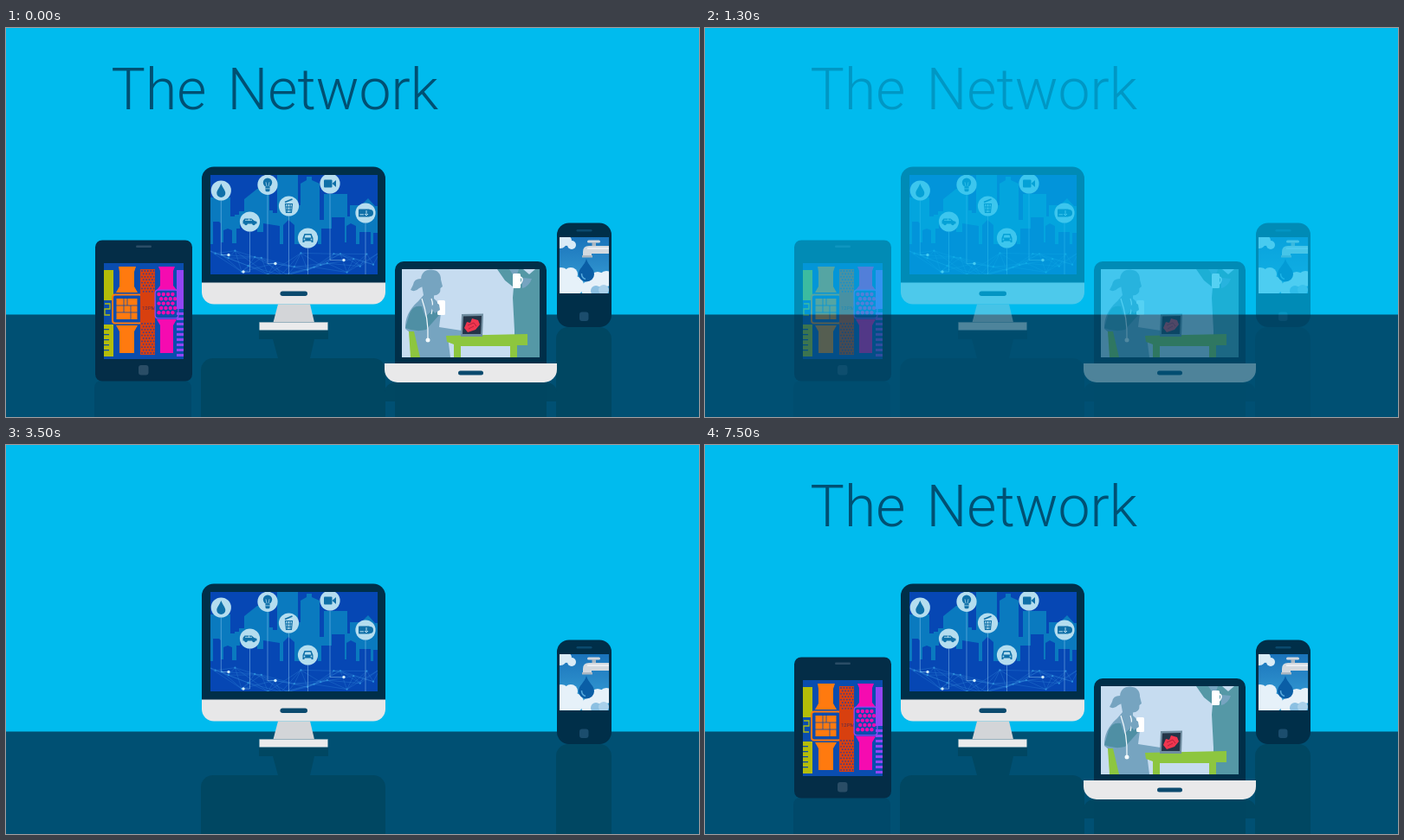
Animation, 800 px wide and 450 px high, one loop 8000 ms. Source, as an HTML page with a canvas:

```html
<!DOCTYPE html>
<html lang="en">
<head>
<meta charset="utf-8">
<title>Devices</title>
<style>
  html, body { margin: 0; width: 100%; height: 100%; overflow: hidden; background: #00bbee; }
  canvas, svg { position: absolute; left: 0; top: 0; width: 800px; height: 450px; display: block; }
  text { font: 300 66px Roboto, "Open Sans", sans-serif; word-spacing: 8px; fill: #005073; }
</style>
</head>
<body>
<canvas id="stage" width="800" height="450"></canvas>
<svg viewBox="0 0 800 450"><text id="title" x="121.5" y="93.5">The Network</text></svg>
<script>
const LOOP = 8000;
const DARK = '#002f49', FLOOR = '#005073', SHADE = '#004762', SLOT = '#0b4a6e';
const BLUE = '#0647b4', PALE = '#b4ddef', INK = '#0f70a8';

const stage = document.getElementById('stage').getContext('2d');
const title = document.getElementById('title');
const layer = document.createElement('canvas');
layer.width = 800;
layer.height = 450;
const c = layer.getContext('2d');

function box(color, x, y, w, h, r = 0) {
  c.fillStyle = color;
  c.beginPath();
  c.roundRect(x, y, w, h, r);
  c.fill();
}

function disc(color, x, y, r) {
  c.fillStyle = color;
  c.beginPath();
  c.arc(x, y, r, 0, Math.PI * 2);
  c.fill();
}

function shape(color, d) {
  c.fillStyle = color;
  c.fill(new Path2D(d));
}

function line(color, d, width = 1) {
  c.strokeStyle = color;
  c.lineWidth = width;
  c.stroke(new Path2D(d));
}

function clipped(x, y, w, h, draw) {
  c.save();
  c.beginPath();
  c.rect(x, y, w, h);
  c.clip();
  draw();
  c.restore();
}

function at(x, y, draw) {
  c.save();
  c.translate(x, y);
  draw();
  c.restore();
}

function vertical(y0, y1, a, b) {
  const g = c.createLinearGradient(0, y0, 0, y1);
  g.addColorStop(0, a);
  g.addColorStop(1, b);
  return g;
}

function seeded(seed) {
  return () => (seed = (seed * 16807) % 2147483647) / 2147483647;
}

const icons = [
  [248.3, 188, 'V262.5 H257', () =>
    shape(INK, 'M0-8C2-3 5 0 5 3A5 5 0 0 1-5 3C-5 0-2-3 0-8Z')],
  [302, 181.3, 'V272.5 H311', () => {
    disc(INK, 0, -2.5, 5.2);
    box(INK, -2.5, 1.5, 5, 6.5, 1.5);
    line(PALE, 'M-2-3 L-1 2 M2-3 L1 2 M-2.5 4.5 H2.5', 0.7);
  }],
  [326.5, 206, 'V285', () => {
    line(INK, 'M-4-2.5H4L3 7.5H-3Z M-1.5-2V7 M1.5-2V7 M-4 1H4 M-3.5 4.3H3.5', 1.1);
    line(INK, 'M-4.5-4.5L4-8', 1.8);
  }],
  [374, 180, 'V268.5 H390', () => {
    box(INK, -7, -4.5, 9.5, 9, 1);
    shape(INK, 'M2.5 0L7-4V4Z');
  }],
  [415, 214, 'V285', () => {
    box(INK, -8, -4.5, 13, 9, 1);
    disc(INK, 5, 0, 4);
    line(PALE, 'M-6.5 1.8H-2 M1-3V3 M-1 1L1 3L3 1', 1);
  }],
  [281.5, 224, 'V282 H274', () => {
    shape(INK, 'M-8 2.5V-1L-6-3.5H2L5-1L8 0V2.5Z');
    disc(INK, -4.5, 2.5, 1.8);
    disc(INK, 4.5, 2.5, 1.8);
    line(PALE, 'M-5.5-1.7H2.5 M-1-3.5V-1', 0.9);
  }],
  [348.5, 243, 'V285', () => {
    shape(INK, 'M-6 5V0L-4-5H4L6 0V5H4V3.5H-4V5Z');
    shape(PALE, 'M-4-.5L-3-3.5H3L4-.5Z');
    disc(PALE, -4, 1.5, 0.9);
    disc(PALE, 4, 1.5, 0.9);
  }]
];

function city() {
  box(BLUE, 236, 170, 193, 115);
  shape('#0a7abf', 'M236 196H259V218H264V216H269V212H275V198L290 186H304V211H308V214H313V170H337V205H340V180L347 176V172H353V176L362 180V222H367V192H394V218H397V205H410L418 197L426 206H429V250H236Z');
  shape(BLUE, 'M236 285V250H239V224H246L248 226V248H251V234L256 232L261 234V249H266V232H270V222H290V236H297V226L316 229V251H320V228L326 222L333 228V252H345V238H360V252H364V232H376V219H391V248H393V229L398 226L404 229V250H408V236H421V250H424V237H429V285Z');
  const rnd = seeded(77);
  const nodes = Array.from({ length: 27 }, (_, i) => [234 + i * 7.6, 257 + rnd() * 29]);
  nodes.forEach(([x, y], i) => {
    for (const k of [1, 3, 5]) {
      const n = nodes[i + k];
      if (n) line('rgba(60,150,225,.45)', `M${x} ${y}L${n[0]} ${n[1]}`, 0.6);
    }
    disc('#2b8fdc', x, y, 1.1);
  });
  for (const [x, y, stem] of icons) line('rgba(150,205,240,.6)', `M${x} ${y + 11}${stem}`, 0.8);
  for (const [x, y] of [[257, 262.5], [311, 272.5], [390, 268.5], [274, 282]]) disc('#d0ecfa', x, y, 1.7);
  for (const [x, y, , draw] of icons) {
    disc(PALE, x, y, 11.6);
    at(x, y, draw);
  }
}

function monitor() {
  box(SHADE, 292, 350, 80, 10);
  shape(SHADE, 'M308 360H356L351 382H314Z');
  box(SHADE, 225, 382, 213, 80, 14);
  box(DARK, 226, 160.5, 212, 150, 14);
  box('#e7e7e8', 226, 294.5, 212, 25, [0, 0, 14, 14]);
  box(SLOT, 316.5, 304.5, 31.5, 5.5, 2.7);
  shape('#d3d5d8', 'M314 319.5H351L356 340.5H308.5Z');
  box('#ebebec', 292.5, 340.5, 79, 9);
  line('#8fa9b8', 'M292.5 340.5H371.5', 0.7);
  clipped(236, 170, 193, 115, city);
}

function cafe() {
  const skin = '#76a4c0', sleeve = '#4f8fa4';
  box('#c6dcf0', 457, 279, 159, 102);
  // Man at right
  shape('#5598a6', 'M567 279H616V381H587V350L585 312L586 300L576 292Z');
  shape(skin, 'M581 279H592L590 285H585Z M596 289L607 290Q604 299 596 301Z');
  shape('#c6dcf0', 'M597 279H611L604 285Z');
  box('#fff', 585, 284, 9, 17, 1.5);
  line('#fff', 'M594 288Q598 290 594 296', 1.5);
  // Woman at left
  shape(skin, 'M479 292Q479 279.5 491 279.5Q502 280.5 502 291L504 299L501.5 301Q502 309 494 309.5V313Q501 318 502 330L500 346L526 350V356L510 357L513 381H474L466 352L461 348Q460 330 476 316L482 309Z');
  shape(skin, 'M481 290Q471 289 470 297L467 303Q472 306 477 301L483 298Z');
  shape(sleeve, 'M466 330Q470 320 480 322L484 334L494 325L501 331L485 349Q473 352 461 347Z');
  line('#f4fafd', 'M480 313Q488 336 487 360 M491 313Q494 320 491 331', 1.2);
  disc('#f4fafd', 487, 361, 2.5);
  box('#fff', 498, 315, 9, 17, 1.5);
  shape(skin, 'M490 323L496 317L500 320L501 326L495 330Z');
  // Furniture and tablet
  shape('#8dc63f', 'M465 351H471L478 381H467Z');
  shape('#8dc63f', 'M508 356L602 354V367H590V381H582V368H525V381H517V366L509 363Z');
  shape('#6f8da0', 'M526 331L551 330.5L550 357L525 357Z');
  shape('#233447', 'M528 333.5L549 333L548 354L527 354Z');
  shape('#f0364f', 'M529 347L532 340L536 341L538 336L545 338L547 343L542 349L533 352Z');
  line('#a71c38', 'M533 344L540 341L543 345 M534 348L540 345', 0.8);
}

function laptop() {
  box(SHADE, 437, 410, 199, 22, [12, 12, 0, 0]);
  box('#004661', 449, 410, 175, 40);
  box(DARK, 449, 270, 175, 118, [10, 10, 0, 0]);
  box('#e9e9ea', 437, 388, 199, 22, [0, 0, 15, 15]);
  box(SLOT, 522, 396.5, 29, 5, 2.5);
  clipped(457, 279, 159, 102, cafe);
}

function tap() {
  box(vertical(242, 307, '#1a74bb', '#3aa2d8'), 639, 242, 57, 65);
  for (const [x, y, r] of [[640, 248, 7], [647, 246, 6], [653, 251, 5]]) disc('#d9ebf6', x, y, r);
  for (const [x, y, r] of [[641, 287, 10], [652, 285, 8], [656, 298, 11], [674, 302, 10], [683, 291, 9], [693, 290, 9], [642, 302, 12]])
    disc('#e6f1f9', x, y, r);
  disc('#8cc0e2', 681, 304, 6);
  disc('#a9d0ea', 690, 303, 6);
  box('#cfd6dd', 671, 245.5, 15, 3, 1.5);
  box('#aab7c2', 676.5, 248, 4.5, 6);
  shape('#d3d9df', 'M666 265V259Q666 252 673 252H696V261H676V265Z');
  box('#aab7c2', 665, 263, 12, 2.5);
  line('#f2f5f7', 'M671 255H696', 1.5);
  shape('#0a5ea6', 'M670 267C672 275 679 278 679 285A9 8.5 0 0 1 661 285C661 278 668 275 670 267Z');
  line('#56a9dc', 'M664.5 284Q664.5 289 669 290.5', 1.5);
}

function phone() {
  box(SHADE, 635, 346, 64, 120, 14);
  box(DARK, 636, 225.5, 63, 120.5, 14);
  box(SLOT, 658.5, 233, 18, 2.5, 1.2);
  box('#1b4d6d', 662, 328.5, 10.5, 10.5, 3);
  clipped(639, 242, 57, 65, tap);
}

function dots(color, x, y, w, h, step, r) {
  for (let j = 0; j * step < h; j++)
    for (let i = 0; i * step < w; i++)
      disc(color, x + i * step + (j % 2) * step / 2, y + j * step, r);
}

function watches() {
  const orange = '#ff7a0f', pink = '#f50bb0', red = '#d8400f', lime = '#b4bd08', violet = '#9245f5';
  box('#0a4daf', 113, 272, 92, 111);
  // Lime strip
  box(lime, 113, 280, 11, 35);
  line(lime, 'M114 319H120V325H114V332H120', 1.3);
  box(lime, 113, 343, 11, 37);
  for (let y = 348; y < 378; y += 6) box('#0a4daf', 113, y, 6, 1.3);
  // Orange watch
  shape(orange, 'M130 276H150L148 282V299L152 306H127L131 299V282Z');
  box(orange, 122, 307.5, 36, 35, 4);
  box('#0a4daf', 124, 309.5, 32, 31, 2);
  box(orange, 127.5, 313, 24, 24);
  line('#0a4daf', 'M127 321H152 M127 329H152 M136 313V329 M144 321V337 M140 313V321', 0.8);
  shape(orange, 'M127 344H152L148 351V376H131V351Z');
  // Red strap
  box(red, 155, 279, 17, 99);
  dots('#3a3f8e', 157, 281, 15, 26, 3.4, 0.9);
  dots('#3a3f8e', 157, 342, 15, 35, 3.4, 0.9);
  c.fillStyle = '#5b2a4a';
  c.font = '6px Roboto, sans-serif';
  c.fillText('12PM', 157, 326);
  // Pink watch
  shape(pink, 'M176 276H195L193 281V298L197 303H174L178 298V281Z');
  box(violet, 171.5, 302.5, 28, 34, 4);
  box('#0a4daf', 172.8, 303.8, 25.4, 31.4, 3);
  dots(pink, 176.5, 308, 17, 25, 5.3, 2.2);
  shape(pink, 'M174 337H197L193 344V376H178V344Z');
  // Violet strip
  box(violet, 197, 280, 8, 45);
  for (let y = 329; y < 380; y += 6) box(violet, 197, y, 8, 3);
}

function tablet() {
  box('#00496a', 102, 408, 112, 60, [8, 8, 0, 0]);
  box('#042d47', 103, 245.5, 112, 163, 8);
  box('#2a4d66', 150, 251.5, 18, 2.5, 1.2);
  box('#2a4d66', 153, 390, 11.5, 11.5, 3);
  clipped(113, 272, 92, 111, watches);
}

const arrivals = [[2500, monitor], [3500, phone], [4500, laptop], [5500, tablet]];
const stepped = (t, start, gap) => Math.min(6, Math.max(0, Math.floor((t - start) / gap) + 1)) / 6;

let last = '';
function render(t) {
  const leaving = t < 1500;
  const alpha = leaving ? 1 - stepped(t, 1000, 100) : 1;
  const shown = arrivals.filter(([start]) => leaving || t >= start);
  const ink = leaving ? alpha : stepped(t, 6500, 200);
  const key = [alpha, shown.length, ink].join();
  if (key === last) return;
  last = key;

  c.clearRect(0, 0, 800, 450);
  shown.forEach(([, draw]) => draw());

  stage.globalAlpha = 1;
  stage.fillStyle = '#00bbee';
  stage.fillRect(0, 0, 800, 332);
  stage.fillStyle = FLOOR;
  stage.fillRect(0, 331.5, 800, 118.5);
  stage.globalAlpha = alpha;
  stage.drawImage(layer, 0, 0);
  title.style.opacity = ink;
}

const begin = performance.now();
function tick() {
  render((performance.now() - begin) % LOOP);
  requestAnimationFrame(tick);
}
tick();
</script>
</body>
</html>
```
